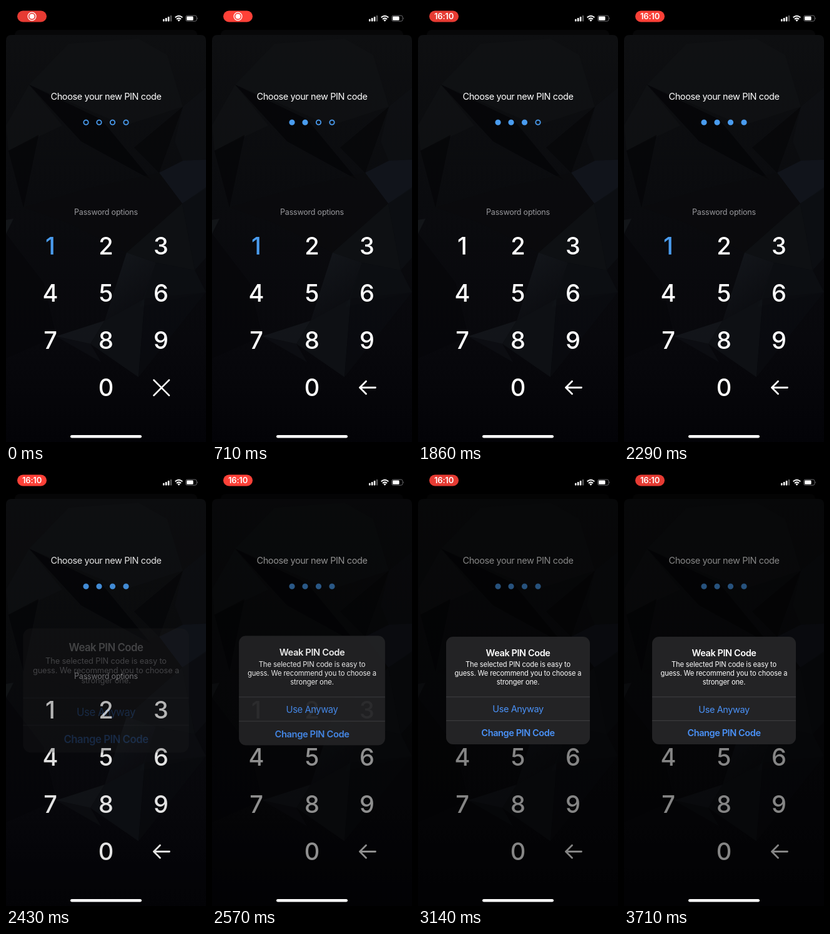
Recreate the animation shown at these times as an HTML page. Size 320 by 693 pixels, loop 3.85 s.

```html
<!DOCTYPE html>
<html lang="en">
<head>
<meta charset="utf-8">
<title>PIN setup</title>
<style>
  html, body { margin: 0; width: 100%; height: 100%; overflow: hidden; background: #000; }
  svg { display: block; width: 100%; height: 100%; }
  text { font-family: Inter, Roboto, sans-serif; text-anchor: middle; fill: #fff; }
  .body { font-size: 14.5px; letter-spacing: -.4px; }
  .bold { font-weight: 600; }
  .small { font-size: 11.1px; letter-spacing: -.12px; }
  .hint { font-size: 12.5px; letter-spacing: -.2px; fill: #98989c; }
  .clock { font-size: 13px; font-weight: 600; letter-spacing: -.2px; }
  .key { font-size: 38px; font-weight: 500; }
  .link { fill: #4a92f8; }
  .line { fill: none; stroke: #fff; stroke-linecap: round; stroke-linejoin: round; }
</style>
</head>
<body>
<svg viewBox="0 0 320 693">
  <defs>
    <linearGradient id="sheet" x2="0" y2="1">
      <stop offset="0" stop-color="#0e0f11"/>
      <stop offset=".4" stop-color="#0a0b0e"/>
      <stop offset=".75" stop-color="#08080c"/>
      <stop offset="1" stop-color="#030307"/>
    </linearGradient>
    <linearGradient id="facet" x2=".6" y2="1">
      <stop offset="0" stop-color="#171b20"/>
      <stop offset="1" stop-color="#0b0c10"/>
    </linearGradient>
  </defs>
  <rect width="320" height="693"/>
  <rect x="14" y="38" width="292" height="30" rx="8" fill="#070708"/>
  <path d="M0 693V55Q0 46 9 46H311Q320 46 320 55V693Z" fill="url(#sheet)"/>

  <g id="facets">
    <path d="M37 125L100 60L212 52L258 78L283 160L190 190Z" fill="#131517" opacity=".45"/>
    <path d="M37 125L90 190L4 230L0 190Z" fill="#121416" opacity=".5"/>
    <path d="M37 125L152 180L232 276L120 215Z" fill="#040406" opacity=".7"/>
    <path d="M283 160L320 130V243L283 247L270 215Z" fill="#111316" opacity=".5"/>
    <path d="M4 230L52 205L28 320Z" fill="#040406" opacity=".6"/>
    <path d="M283 160L245 265L205 225Z" fill="#050507" opacity=".6"/>
    <path d="M245 265L283 246L320 244V290L282 314Z" fill="#12161d" opacity=".9"/>
    <path d="M282 314L320 288V400L302 420Z" fill="#0d0f13" opacity=".8"/>
    <path d="M0 340L12 338L0 362Z" fill="#15181b" opacity=".8"/>
    <path d="M28 320L130 290L245 265L282 314L193 392L100 345Z" fill="#0a0b0d" opacity=".6"/>
    <path d="M282 314L193 392L240 408L302 420Z" fill="#0f1215" opacity=".8"/>
    <path d="M193 392L240 408L222 465L158 500Z" fill="url(#facet)" opacity=".8"/>
    <path d="M240 408L302 420L320 455L214 478Z" fill="#0d0f13" opacity=".8"/>
    <path d="M158 500L222 465L212 590L135 537Z" fill="#101317" opacity=".75"/>
    <path d="M222 465L320 455L212 590Z" fill="#0a0c10" opacity=".7"/>
    <path d="M80 525L158 500L135 537Z" fill="#171a1e" opacity=".7"/>
    <path d="M80 525L135 537L152 566Z" fill="#0f1114" opacity=".7"/>
    <path d="M0 362L60 440L80 525L0 560Z" fill="#060609" opacity=".6"/>
  </g>

  <text class="body" x="160" y="149">Choose your new PIN code</text>
  <g id="dots" stroke="#4a9cef" stroke-width="1.8"></g>
  <text class="hint" x="160" y="331.5">Password options</text>
  <g id="keys"></g>
  <path id="cross" class="line" stroke-width="2.5" d="M236.5 594.5L261 619M261 594.5L236.5 619"/>
  <path id="back" class="line" stroke-width="2.8" d="M261.5 606.5H236.5M246.5 596.5L236.5 606.5L246.5 616.5"/>

  <rect id="dim" width="320" height="693"/>

  <g id="alert">
    <rect x="45" y="265" width="230" height="171" rx="11" fill="#232325"/>
    <path d="M45 360.7H275M45 398.4H275" stroke="#47474a" stroke-width=".8"/>
    <text class="body bold" x="160" y="296">Weak PIN Code</text>
    <g id="message"></g>
    <text class="body link" x="160" y="385.5">Use Anyway</text>
    <text class="body bold link" x="160" y="423.3">Change PIN Code</text>
  </g>

  <rect id="pill" x="18" y="7.5" width="47" height="18" rx="9"/>
  <g id="record">
    <circle class="line" cx="41.5" cy="16.5" r="6.4" stroke-width="1.3"/>
    <circle cx="41.5" cy="16.5" r="4" fill="#fff"/>
  </g>
  <text id="clock" class="clock" x="41.5" y="21.2">16:10</text>

  <g id="status" fill="#fff">
    <rect x="251" y="20.8" width="2.6" height="3.7" rx=".7"/>
    <rect x="254.9" y="19" width="2.6" height="5.5" rx=".7"/>
    <rect x="258.8" y="17" width="2.6" height="7.5" rx=".7"/>
    <rect x="262.7" y="15" width="2.6" height="9.5" rx=".7" opacity=".35"/>
    <g fill="none" stroke="#fff" stroke-width="2">
      <path d="M270.7 18.3Q276.5 13.2 282.3 18.3"/>
      <path d="M273 20.9Q276.5 17.9 280 20.9"/>
    </g>
    <path d="M274.4 22.4Q276.5 20.8 278.6 22.4L276.5 24.7Z"/>
    <rect x="287.6" y="15.2" width="17.4" height="9" rx="2.6" fill="none" stroke="#77777a" stroke-width=".9"/>
    <rect x="289" y="16.6" width="10.6" height="6.2" rx="1.3"/>
    <path d="M306.1 18.2Q307.8 19.7 306.1 21.2Z" fill="#77777a"/>
  </g>
  <rect x="103" y="682" width="114" height="4.4" rx="2.2" fill="#fff"/>
</svg>
<script>
const $ = id => document.getElementById(id);

function add(parent, tag, attrs, text = '') {
  const el = document.createElementNS('http://www.w3.org/2000/svg', tag);
  for (const k in attrs) el.setAttribute(k, attrs[k]);
  el.textContent = text;
  return $(parent).appendChild(el);
}

const LOOP = 3850, RATE = 7 / 1000, LAST = 26;
const BLUE = '#4a9cef';
const fills = [140, 640, 1280, 2280];                       // a digit is entered
const presses = [[0, 280], [560, 850], [1280, 1560], [2130, 2400]];
const ALERT = 2390, SPRING = .0228;

const dots = [128, 149, 170.5, 192].map(cx => add('dots', 'circle', { cx, cy: 185, r: 3.7 }));

const keys = [1, 2, 3, 4, 5, 6, 7, 8, 9, 0].map((n, i) => add('keys', 'text', {
  class: 'key',
  x: n ? [71, 160, 248][i % 3] : 160,
  y: 395.2 + 75 * Math.floor(n ? i / 3 : 3)
}, n));

['The selected PIN code is easy to',
 'guess. We recommend you to choose a',
 'stronger one.'].forEach((line, i) =>
  add('message', 'text', { class: 'small', x: 160, y: 313.4 + 13.65 * i }, line));

const clamp = x => Math.max(0, Math.min(1, x));
const show = (id, on) => $(id).setAttribute('opacity', +on);

function draw(t) {
  dots.forEach((d, i) => d.setAttribute('fill', t >= fills[i] ? BLUE : 'none'));
  keys[0].style.fill = presses.some(([a, b]) => t >= a && t < b) ? BLUE : '#fff';
  show('cross', t < fills[0]);
  show('back', t >= fills[0]);

  // critically damped spring drives the alert's fade and shrink
  const x = SPRING * Math.max(0, t - ALERT);
  const rest = (1 + x) * Math.exp(-x);
  const scale = 1 + .2 * rest;
  show('dim', .48 * (1 - rest));
  show('alert', 1 - rest);
  $('alert').setAttribute('transform', `translate(160 350.5) scale(${scale}) translate(-160 -350.5)`);

  const glow = Math.cos((t - 2500) / 1850 * 2 * Math.PI);
  $('pill').setAttribute('fill', `rgb(${239 + 15 * glow},${61 + 4 * glow},${53 + 3 * glow})`);
  const time = clamp((t - 1280) / 280);
  show('record', 1 - time);
  show('clock', time);
}

function tick(now) {
  const n = Math.min(LAST, Math.floor((now % LOOP + 5) * RATE));
  draw(Math.round(n / RATE / 10) * 10);
  requestAnimationFrame(tick);
}
draw(0);
requestAnimationFrame(tick);
</script>
</body>
</html>
```
